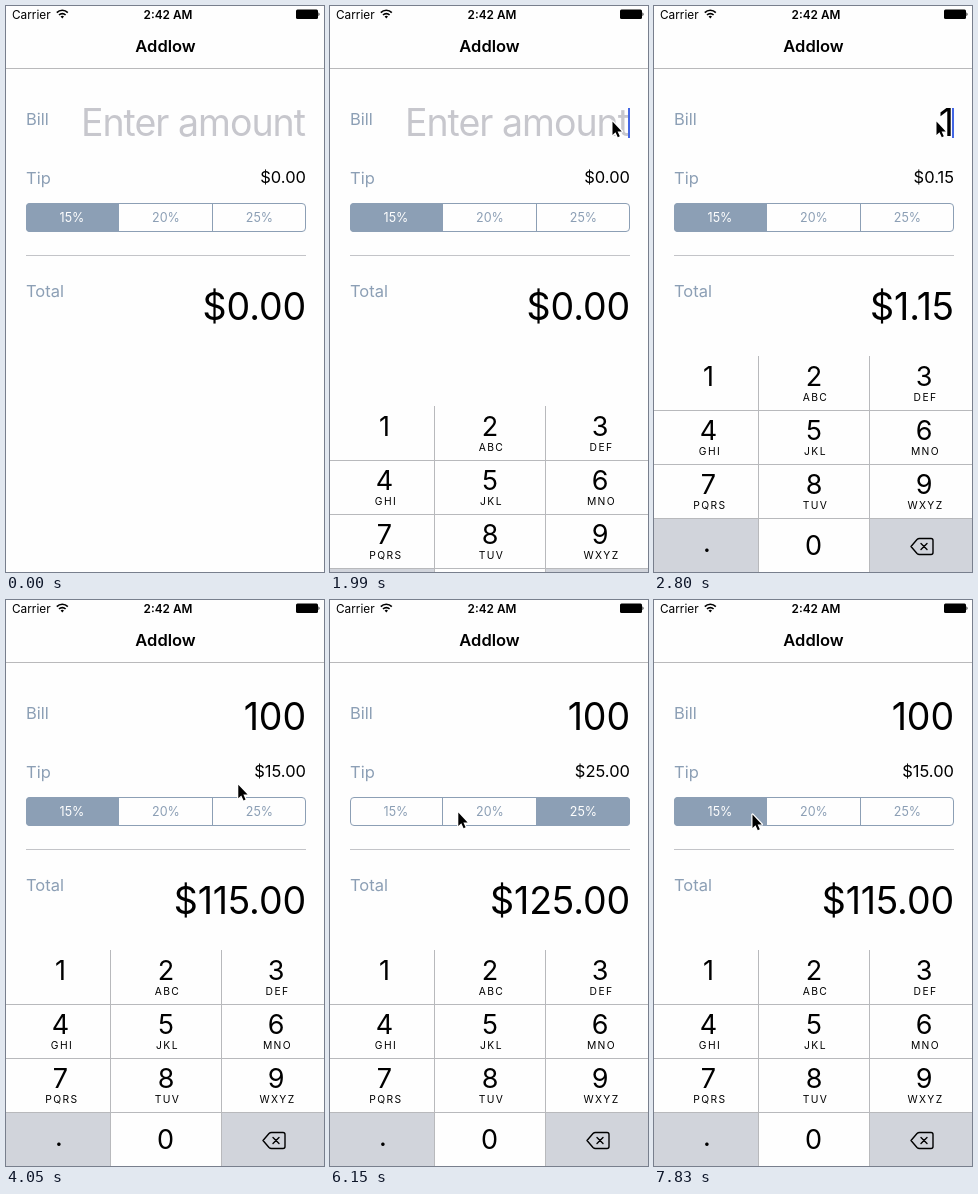
Animation, 318 px wide and 566 px high, one loop 8 s. Source, as an HTML page:

```html
<!DOCTYPE html>
<html lang="en">
<head>
<meta charset="utf-8">
<title>Tip calculator</title>
<style>
  html, body { margin: 0; width: 100%; height: 100%; overflow: hidden; background: #fefefe; }
  svg { display: block; width: 318px; height: 566px; font-family: Inter, "Open Sans", sans-serif; }
  .accent { fill: #8c9fb5; }
  .label { font-size: 16.5px; fill: #8c9fb5; }
  .big { font-size: 37.5px; letter-spacing: -0.1px; }
  .hint { fill: #c7c7cd; letter-spacing: -1px; }
  .option { font-size: 12.5px; text-anchor: middle; }
  .digit { font-size: 27px; text-anchor: middle; }
  .letters { font-size: 10.3px; letter-spacing: 1.4px; text-anchor: middle; }
  .end { text-anchor: end; }
  .mid { text-anchor: middle; }
</style>
</head>
<body>
<svg viewBox="0 0 318 566">
  <rect width="318" height="566" fill="#fefefe"/>

  <text x="6" y="13" font-size="11.8">Carrier</text>
  <g fill="none" stroke="#000" stroke-width="1.6">
    <path d="M50.8 6.6a7.6 7.6 0 0 1 11 0M53 9a4.6 4.6 0 0 1 6.6 0"/>
    <path d="M56.3 12.6l-1.7-2a2.5 2.5 0 0 1 3.4 0z" fill="#000" stroke="none"/>
  </g>
  <text class="mid" x="162" y="13" font-size="11.8" font-weight="600">2:42 AM</text>
  <rect x="290" y="3.5" width="22" height="9.5" rx="1.5"/>
  <path d="M312.5 6.2q2 2 0 4z"/>
  <text class="mid" x="159.5" y="46" font-size="16.5" font-weight="600">Addlow</text>
  <path d="M0 62.5H318" stroke="#b9b9bb"/>

  <text class="label" x="20" y="119">Bill</text>
  <text class="label" x="20" y="178">Tip</text>
  <text class="label" x="20" y="291">Total</text>
  <text class="big end hint" id="hint" x="299" y="130">Enter amount</text>
  <text class="big end" id="bill" x="300" y="130"></text>
  <text class="end" id="tip" x="300" y="177" font-size="16.5"></text>
  <text class="big end" id="total" x="300" y="314"></text>
  <rect id="caret" x="298" y="102" width="2" height="30" fill="#4467e4"/>

  <clipPath id="pill"><rect x="20" y="197" width="280" height="29" rx="4"/></clipPath>
  <g clip-path="url(#pill)"><rect class="accent" id="choice" y="197" height="29"/></g>
  <path d="M112.5 197v29M206.5 197v29" stroke="#8c9fb5"/>
  <rect x="20.5" y="197.5" width="279" height="28" rx="3.5" fill="none" stroke="#8c9fb5"/>
  <g id="options"></g>
  <path d="M20 249.5H300" stroke="#c3c4c8"/>

  <g id="keyboard">
    <rect y="350" width="318" height="216" fill="#fefefe"/>
    <path d="M0 513H104V566H0zM216 513H318V566H216z" fill="#d1d4db"/>
    <path d="M104.5 350V566M215.5 350V566M0 404.5H318M0 458.5H318M0 512.5H318" stroke="#b8b9bc"/>
    <g id="keys"></g>
    <g fill="none" stroke="#000" stroke-width="1.4" stroke-linejoin="round" stroke-linecap="round">
      <path d="M257 540.5l6-7q1-1 2.5-1H277q2 0 2 2v12q0 2-2 2H265.5q-1.5 0-2.5-1z"/>
      <path d="M267 537.5l6 6m0-6l-6 6"/>
    </g>
  </g>

  <path id="pointer" d="M.5 .5V14L3.5 11.2L5.8 16.2L7.8 15.3L5.6 10.4H9.8Z"
        stroke="#fff" stroke-width="2.4" paint-order="stroke" stroke-linejoin="round"/>
</svg>
<script>
const LOOP = 8000;
const KEYBOARD_START = 1804;
const FOCUS = 1630;
const typed = [[0, ""], [2800, "1"], [3040, "10"], [3220, "100"]];
const selected = [[0, 0], [4630, 1], [5510, 2], [6960, 0]];
const rates = [15, 20, 25];
const edges = [20, 113, 207, 300];

// Pointer stops: time, x, y
const stops = [
  [450, 149, 585], [800, 206, 330], [1050, 255, 180], [1270, 277, 113], [1390, 282, 115],
  [3770, 282, 115], [4050, 232, 184], [4270, 178, 208], [4510, 148, 213],
  [4720, 148, 213], [5160, 254, 212], [5560, 254, 212],
  [6150, 128, 212], [6260, 118, 213], [6400, 118, 213], [6690, 98, 214], [LOOP, 98, 214]
];

const $ = id => document.getElementById(id);
const current = (list, t) => list.filter(([start]) => start <= t).pop();

function addText(parent, cls, x, y, content) {
  const node = document.createElementNS("http://www.w3.org/2000/svg", "text");
  node.setAttribute("class", cls);
  node.setAttribute("x", x);
  node.setAttribute("y", y);
  node.textContent = content;
  parent.append(node);
  return node;
}

const options = rates.map((rate, i) => addText($("options"), "option", [66, 160, 253.5][i], 216, rate + "%"));

const columns = [54.5, 160, 270];
["", "ABC", "DEF", "GHI", "JKL", "MNO", "PQRS", "TUV", "WXYZ"].forEach((letters, i) => {
  const x = columns[i % 3], y = 380 + 54 * Math.floor(i / 3);
  addText($("keys"), "digit", x, y, i + 1);
  addText($("keys"), "letters", x + 1.5, y + 15, letters);
});
addText($("keys"), "digit", 53, 546, ".");
addText($("keys"), "digit", 159.5, 549, "0");

// Velocity at a stop; zero wherever the pointer rests
function slope(i, axis) {
  const a = stops[Math.max(i - 1, 0)], b = stops[i], c = stops[Math.min(i + 1, stops.length - 1)];
  const same = (p, q) => p !== q && p[1] === q[1] && p[2] === q[2];
  return same(a, b) || same(b, c) ? 0 : (c[axis] - a[axis]) / (c[0] - a[0]);
}

function pointerAt(t) {
  if (t < stops[0][0]) return [0, 700];
  const i = stops.findIndex((stop, n) => n && t <= stop[0]) - 1;
  const a = stops[i], b = stops[i + 1], span = b[0] - a[0], u = (t - a[0]) / span;
  return [1, 2].map(axis => {
    const ease = u * u * (3 - 2 * u);
    return a[axis] + (b[axis] - a[axis]) * ease
      + span * u * (1 - u) * (slope(i, axis) * (1 - u) - slope(i + 1, axis) * u);
  });
}

// Stays lit after a key press, then blinks with soft fades
function caretAlpha(t) {
  if (t < FOCUS) return 0;
  const since = t - Math.max(FOCUS, current(typed, t)[0]) - 590;
  if (since < 0) return 1;
  const phase = since % 962;
  return phase < 465 ? Math.max(0, 1 - phase / 160) : Math.min(1, (phase - 465) / 80);
}

function keyboardOffset(t) {
  const s = Math.max(0, t - KEYBOARD_START) * 0.015;
  return Math.round(216 * (1 + s) * Math.exp(-s));
}

function draw(t) {
  const bill = current(typed, t)[1], choice = current(selected, t)[1];
  const tip = bill * rates[choice] / 100;
  $("hint").style.display = bill ? "none" : "";
  $("bill").textContent = bill;
  $("tip").textContent = "$" + tip.toFixed(2);
  $("total").textContent = "$" + (+bill + tip).toFixed(2);
  $("caret").setAttribute("opacity", caretAlpha(t));

  $("choice").setAttribute("x", edges[choice]);
  $("choice").setAttribute("width", edges[choice + 1] - edges[choice]);
  options.forEach((node, i) => node.setAttribute("fill", i === choice ? "#fefefe" : "#8c9fb5"));

  $("keyboard").setAttribute("transform", `translate(0 ${keyboardOffset(t)})`);
  $("pointer").setAttribute("transform", `translate(${pointerAt(t)})`);
}

const begin = performance.now();
function tick() {
  draw((performance.now() - begin) % LOOP);
  requestAnimationFrame(tick);
}
tick();
</script>
</body>
</html>
```
